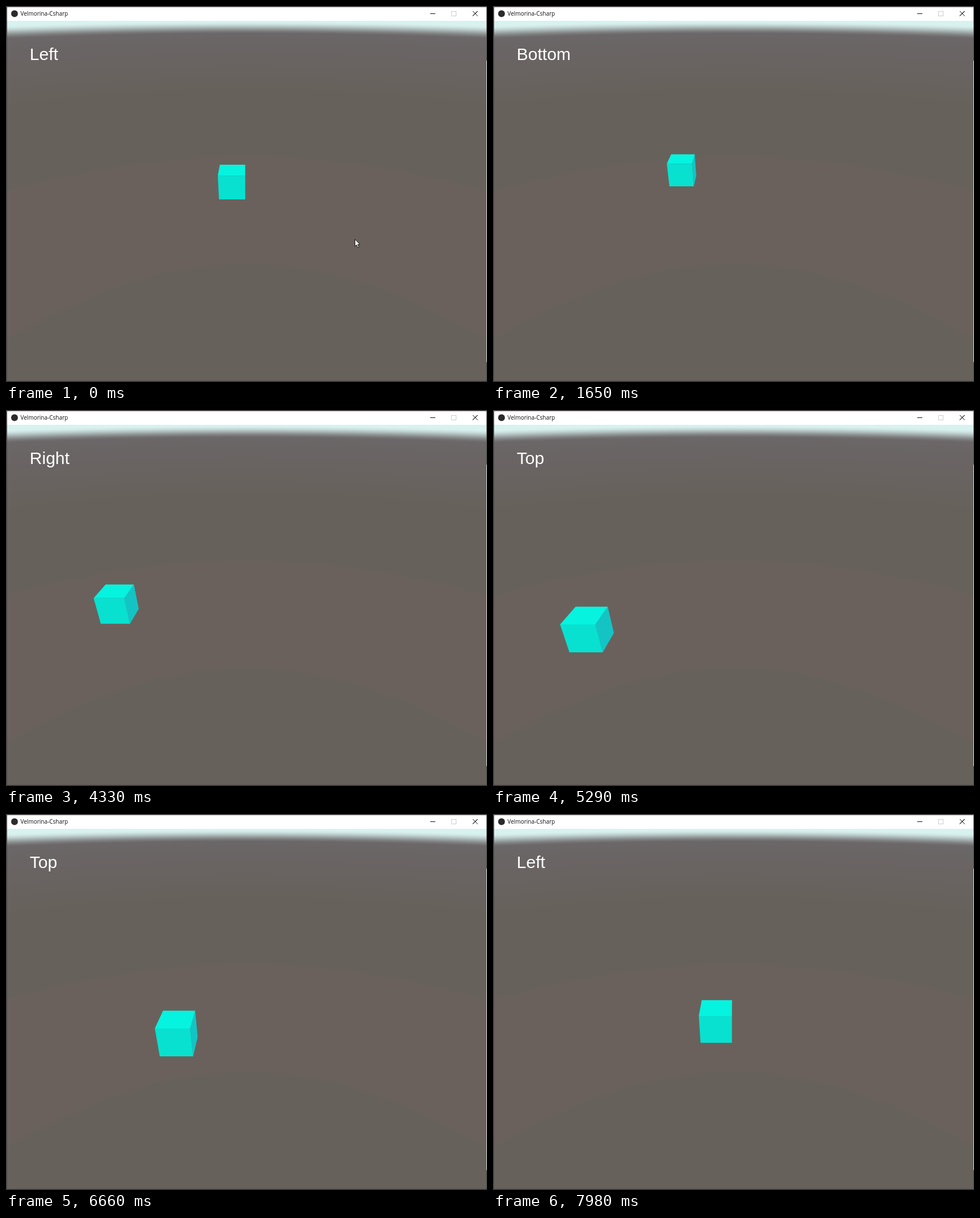
Animation, 847 px wide and 661 px high, one loop 8000 ms. Source, as an HTML page with a canvas:

```html
<!DOCTYPE html>
<html lang="en">
<head>
<meta charset="utf-8">
<title>Cube patrol</title>
<style>
  html, body { margin: 0; width: 100%; height: 100%; overflow: hidden; background: #4a4547; }
  canvas { display: block; }
</style>
</head>
<body>
<canvas id="stage" width="847" height="661"></canvas>
<script>
const LOOP = 8000;
const VIEW = { x: 2, y: 26, w: 844, h: 633 };
const CENTER = { x: 423.5, y: 342.5 };
const FOCAL = 548.2;              // 60 degree vertical field of view
const PITCH = Math.PI / 6;        // camera looks 30 degrees down
const SIN = Math.sin(PITCH), COS = Math.cos(PITCH);

const ctx = document.getElementById('stage').getContext('2d');

const lerp = (a, b, k) => a + (b - a) * k;
const mix = (from, to, k) => from.map((v, i) => lerp(v, to[i], k));
const clamp = k => Math.min(1, Math.max(0, k));
const smooth = k => k * k * (3 - 2 * k);

function fillRect(g, color, x, y, w, h) {
  g.fillStyle = color;
  g.fillRect(x, y, w, h);
}

function tracePath(g, points) {
  g.beginPath();
  points.forEach(p => g.lineTo(...p));
  g.closePath();
}

function strokeLine(g, ...points) {
  tracePath(g, points);
  g.stroke();
}

const HAZE = [216, 242, 240], DUSK = [107, 102, 103];
const SOIL = [102, 97, 90], CLAY = [106, 97, 92];

// Colour by degrees below the horizon.
function groundColor(angle) {
  if (angle < 2) return mix(HAZE, DUSK, smooth(clamp((angle - 0.1) / 1.8)));
  if (angle > 22 && angle < 41.3) return CLAY;
  return mix(DUSK, SOIL, clamp((angle - 2) / 9));
}

function paintGround(g) {
  const image = g.createImageData(VIEW.w, VIEW.h);
  for (let i = 0; i < VIEW.w * VIEW.h; i++) {
    const x = VIEW.x + i % VIEW.w + 0.5 - CENTER.x;
    const y = VIEW.y + Math.floor(i / VIEW.w) + 0.5 - CENTER.y;
    const drop = (y * COS + FOCAL * SIN) / Math.hypot(x, y, FOCAL);
    const angle = Math.asin(drop) * 180 / Math.PI;
    const sag = 0.5 * (x / CENTER.x) ** 2 * Math.exp(-angle / 4);
    image.data.set([...groundColor(angle - sag), 255], i * 4);
  }
  g.putImageData(image, VIEW.x, VIEW.y);
}

function paintWindow() {
  const layer = document.createElement('canvas');
  layer.width = 847;
  layer.height = 661;
  const g = layer.getContext('2d');
  fillRect(g, '#4a4547', 0, 0, 847, 661);
  fillRect(g, '#d8d8d8', 846, 96, 1, 530);
  fillRect(g, '#3a2c33', 0, 660, 847, 1);
  fillRect(g, '#fff', 2, 2, 844, 24);
  paintGround(g);

  g.fillStyle = '#2b2b2b';
  g.beginPath();
  g.arc(15, 13.5, 6, 0, Math.PI * 2);
  g.fill();
  g.fillStyle = '#111';
  g.font = '10px "Open Sans", "Noto Sans", sans-serif';
  g.fillText('Velmorina-Csharp', 25.5, 17);

  g.strokeStyle = '#ccc';
  g.strokeRect(784.5, 9.5, 8, 8);
  g.strokeStyle = '#111';
  strokeLine(g, [747, 13.5], [756, 13.5]);
  strokeLine(g, [822, 9], [830.5, 17.5]);
  strokeLine(g, [830.5, 9], [822, 17.5]);
  return layer;
}

// The cube walks around a rectangle; x is its left edge, z its front face.
const SIZE = 1.02, TOP = -4.99, BASE = TOP - SIZE;
const LEFT = -5.09, RIGHT = -1.07, NEAR = 7.51, FAR = 11.63, START = 10.52;
const LEGS = [
  { label: 'Left', from: [RIGHT, START], to: [RIGHT, FAR] },
  { label: 'Bottom', from: [RIGHT, FAR], to: [LEFT, FAR] },
  { label: 'Right', from: [LEFT, FAR], to: [LEFT, NEAR] },
  { label: 'Top', from: [LEFT, NEAR], to: [RIGHT, NEAR] },
  { label: 'Left', from: [RIGHT, NEAR], to: [RIGHT, FAR] }
];

// Seconds and distance walked: an uneven start, then a steady pace.
const PACE = [[0, 0], [0.81, 1.44], [1.65, 2.73], [2.44, 4.28], [3.26, 5.6], [4.33, 7.67], [8, 14]];

function distanceAt(seconds) {
  const i = PACE.findIndex(key => key[0] > seconds);
  const [t0, d0] = PACE[i - 1], [t1, d1] = PACE[i];
  return lerp(d0, d1, (seconds - t0) / (t1 - t0));
}

function poseAt(t) {
  let rest = distanceAt(t / 1000);
  for (const { label, from, to } of LEGS) {
    const length = Math.hypot(to[0] - from[0], to[1] - from[1]);
    if (rest <= length) {
      const [x, z] = mix(from, to, rest / length);
      return { x, z, label };
    }
    rest -= length;
  }
}

function project([x, y, z]) {
  const scale = FOCAL / (z * COS - y * SIN);
  return [CENTER.x + x * scale, CENTER.y - (y * COS + z * SIN) * scale];
}

function drawFace(color, corners) {
  ctx.fillStyle = color;
  tracePath(ctx, corners.map(project));
  ctx.fill();
}

function drawCube(x, z) {
  const r = x + SIZE, back = z + SIZE;
  drawFace('#14c4c4', [[r, TOP, z], [r, TOP, back], [r, BASE, back], [r, BASE, z]]);
  drawFace('#06f3df', [[x, TOP, z], [x, TOP, back], [r, TOP, back], [r, TOP, z]]);
  drawFace('#08e1d0', [[x, TOP, z], [r, TOP, z], [r, BASE, z], [x, BASE, z]]);
}

// The pointer leaves the window to the right.
function drawPointer(t) {
  if (t > 380) return;
  const k = clamp((t - 20) / 360) ** 2;
  ctx.save();
  ctx.translate(614.5 + 217 * k, 410 - 8 * k);
  tracePath(ctx, [[0, 0], [0, 12.5], [2.8, 10], [5, 15], [7, 14], [4.9, 9.2], [8.6, 9]]);
  ctx.fillStyle = '#fff';
  ctx.strokeStyle = '#111';
  ctx.fill();
  ctx.stroke();
  ctx.restore();
}

const backdrop = paintWindow();

function render(t) {
  const { x, z, label } = poseAt(t);
  ctx.drawImage(backdrop, 0, 0);
  drawCube(x, z);
  ctx.fillStyle = '#fff';
  ctx.font = '30px "Liberation Sans", Arial, sans-serif';
  ctx.fillText(label, 41.8, 95);
  drawPointer(t);
}

const begin = performance.now();
function tick() {
  render((performance.now() - begin) % LOOP);
  requestAnimationFrame(tick);
}
tick();
</script>
</body>
</html>
```
